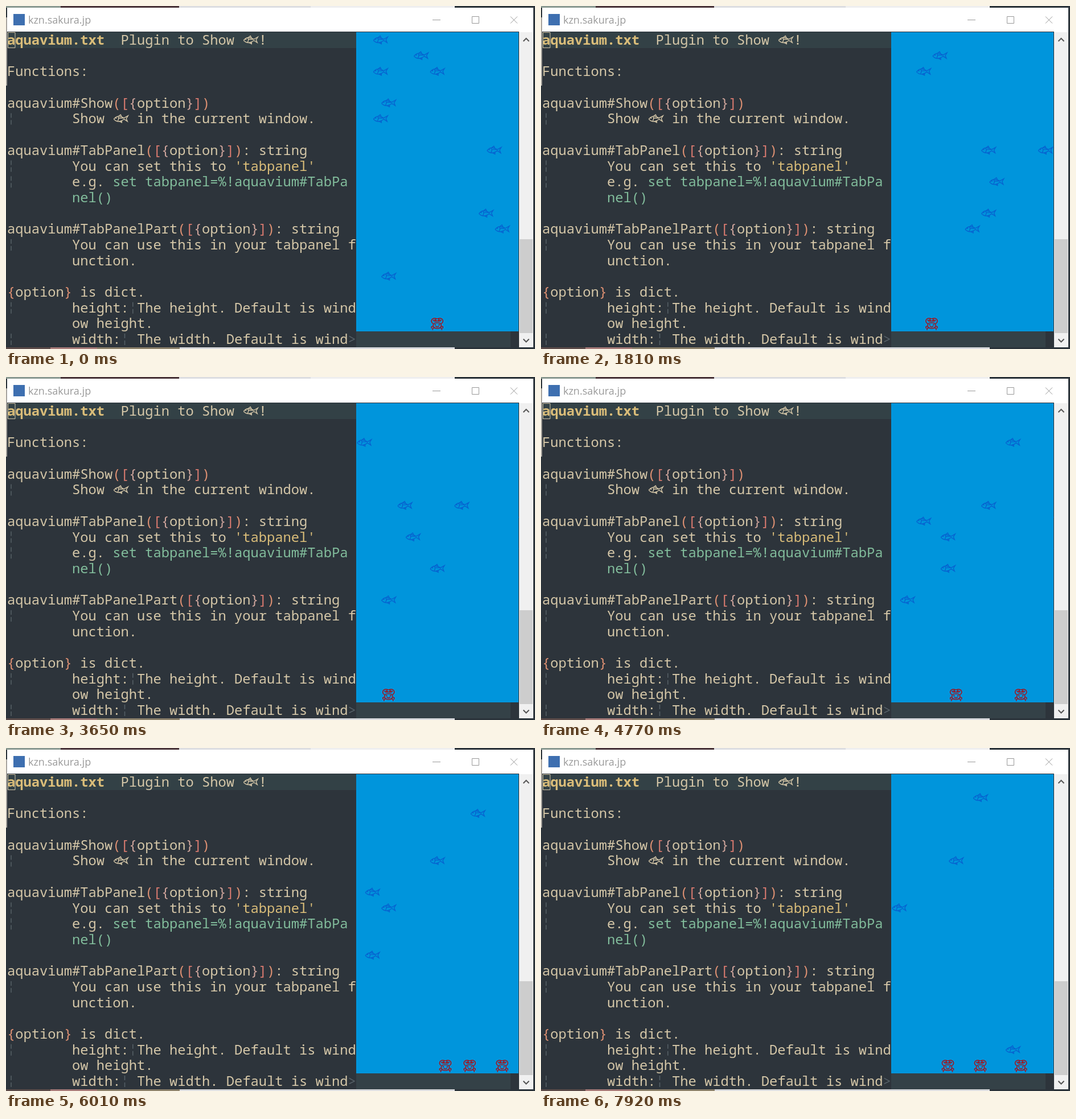
An HTML page with a canvas for the animation above (8 s loop, 929x603 px).

```html
<!DOCTYPE html>
<html lang="en">
<head>
<meta charset="utf-8">
<title>Aquavium</title>
<style>
  html, body { margin: 0; width: 100%; height: 100%; overflow: hidden; background: #2d343b; }
  canvas { display: block; }
</style>
</head>
<body>
<canvas id="stage" width="929" height="603"></canvas>
<script>
const ctx = document.getElementById('stage').getContext('2d');
const LOOP = 8000, CELL_W = 14.25, CELL_H = 27.69, LEFT = 2, TOP = 46, PANEL_COL = 43;
const INK = '#d5c7a8', GREEN = '#82bd9c', YELLOW = '#dabd79', DIM = '#566067', ORANGE = '#df9173';
const BRACKETS = { '(': ORANGE, ')': ORANGE, '[': '#db7b70', ']': '#db7b70', '{': '#cfa59c', '}': '#cfa59c' };

const cellX = col => LEFT + col * CELL_W;
const cellY = row => TOP + row * CELL_H;

function rect(color, x, y, w, h) {
  ctx.fillStyle = color;
  ctx.fillRect(x, y, w, h);
}

function line(color, width, path) {
  ctx.strokeStyle = color;
  ctx.lineWidth = width;
  ctx.stroke(new Path2D(path));
}

// ---- Terminal text ----
function put(row, col, text, color = INK, weight = 400) {
  ctx.font = `${weight} 23.75px "Noto Sans Mono", monospace`;
  for (const part of text.split(/([()[\]{}])/)) {
    ctx.fillStyle = color === INK && BRACKETS[part] || color;
    ctx.fillText(part, cellX(col), cellY(row) + 22);
    col += part.length;
  }
}

function indentMark(row, col) {
  const x = cellX(col) + 7, y = cellY(row);
  line(DIM, 1.5, `M${x} ${y + 4}v8m0 4v8`);
}

// ---- Creatures ----
const FISH = 'M2 1Q9-8 20-1L27-5 24 0 26 5 20 1Q10 9 2 1M9-4Q12 0 9 4M10-4L14-7 16-3M12 5L16 7V4M11-1h8';
const HALF_CRAB = 'M0-2Q8-2 7 4 6 8 0 8M7 0Q12-3 9-8 6-11 1-9L4-7 1-5Q6-4 7-7M7 4L10 5V8M5 7L8 8V11M0 6L3 4';

function fish(col, row, color) {
  ctx.save();
  ctx.translate(cellX(col), cellY(row) + 13.5);
  line(color, 1.4, FISH);
  rect(color, 5, -2, 2, 2);
  ctx.restore();
}

function crab(col, row) {
  const color = '#a5131b';
  ctx.save();
  ctx.translate(cellX(col + 1), cellY(row) + 14.3);
  for (const side of [1, -1]) {
    ctx.scale(side, 1);
    line(color, 1.5, HALF_CRAB);
    rect(color, 2.5, 0.5, 2, 2);
  }
  ctx.restore();
}

// ---- Window ----
function strip(y, bands) {
  let x = 0;
  for (const [color, width] of bands) {
    rect(color, x, y, width, 3);
    x += width;
  }
}

function drawWindow() {
  rect('#2b333a', 0, 0, 929, 603);
  strip(0, [['#8b9a92', 96], ['#49343a', 208], ['#dcdde1', 231], ['#eeeeef', 253]]);
  strip(600, [['#5a4a48', 78], ['#a67a78', 82], ['#8b806a', 145], ['#d8d9dc', 483]]);
  rect('#a9a5a0', 0, 20, 2, 120);

  rect('#fff', 2, 3, 924, 43);
  rect('#3e6fb0', 13, 14, 20, 20);
  ctx.fillStyle = '#999';
  ctx.font = '18px "Open Sans", sans-serif';
  ctx.fillText('kzn.sakura.jp', 39, 31);
  line('#999', 1, 'M749 24.5h14M818.5 18.5h12v12h-12zM886 18.5l12 12m0-12l-12 12');

  rect('#2d343b', 2, 45, 899, 555);
  rect('#f0f0f0', 901, 46, 25, 554);
  rect('#cdcdcd', 902, 410, 23, 165);
  line('#555', 2, 'M908.5 62l5-5 5 5M908.5 585.5l5 5 5-5');
  rect('#334146', 2, TOP, 613, 28);
  rect('#344147', 615, 572, 271, 28);
}

function drawHelp() {
  put(0, 0, 'aquavium.txt', YELLOW, 700);
  put(0, 14, 'Plugin to Show   !');
  fish(29, 0, INK);
  line(INK, 1, 'M3.5 46.5h12.5v27h-12.5z');

  const lines = [
    '', '', 'Functions:', '',
    'aquavium#Show([{option}])',
    '        Show    in the current window.', '',
    'aquavium#TabPanel([{option}]): string',
    '        You can set this to',
    '        e.g.', '', '',
    'aquavium#TabPanelPart([{option}]): string',
    '        You can use this in your tabpanel f',
    '        unction.', '',
    ' option  is dict.',
    '        height: The height. Default is wind',
    '        ow height.',
    '        width:  The width. Default is wind'
  ];
  lines.forEach((text, row) => put(row, 0, text));
  fish(13, 5, INK);
  put(8, 28, "'tabpanel'", YELLOW);
  put(9, 13, 'set tabpanel=%!aquavium#TabPa', GREEN);
  put(10, 8, 'nel()', GREEN);
  put(16, 0, '{      }', ORANGE);
  put(19, 42, '>', DIM);

  for (const row of [5, 8, 9, 13, 17, 19]) indentMark(row, 0);
  indentMark(17, 15);
  indentMark(19, 14);
}

// ---- Aquarium ----
const KEYS = [0, 970, 2660, 3650, 4770, 6010, 7920];
const swimmers = [];

// cols holds the column at each key time from `first` on; turns maps a key to a new row.
function swim(draw, first, row, cols, turns = {}) {
  swimmers.push({ draw, first, row, cols, turns });
}

const blueFish = (col, row) => fish(col, row, '#0763cf');
const addFish = (...track) => swim(blueFish, ...track);
const addCrab = (first, cols) => swim(crab, first, 18, cols);

for (const row of [0, 2, 5]) addFish(0, row, [2, -1]);
for (const row of [4, 15]) addFish(0, row, [3, -1]);
addFish(0, 1, [7, 7, 3, 0, -4], { 3: 2 });
addFish(0, 2, [9, 6, -1]);
addFish(0, 7, [16, 14, 8, 5, 3, 1, -2], { 2: 6, 4: 7 });
addFish(0, 9, [20, 15, 9, 6, 6, 3, 0], { 3: 8 });
addFish(0, 11, [15, 13, 9, 9, 6, 1, -4], { 2: 10, 5: 11 });
addFish(0, 12, [17, 12, 6, 3, 1, -2]);
addFish(1, 7, [20, 15, 12, 11, 9, 7], { 3: 6, 5: 5 });
addFish(3, 2, [20, 14, 14, 10], { 6: 1 });
addFish(5, 17, [20, 14]);
addCrab(0, [9, 5, 2, 3, 7, 10, 6]);
addCrab(3, [20, 15, 13, 10]);
addCrab(4, [20, 17, 15]);

// Redraws come about every 210 ms, with a few pauses.
const BURSTS = [
  [130, 970, 5], [1180, 1810, 4], [2240, 3010, 5], [3650, 4490, 5],
  [4770, 5800, 6], [6010, 7020, 6], [7260, 7400, 2], [7710, 7920, 2]
];

function lastTick(t) {
  const burst = BURSTS.findLast(([first]) => first <= t);
  if (!burst) return 0;
  const [first, last, count] = burst, step = (last - first) / (count - 1);
  return Math.min(last, first + Math.floor((t - first) / step + 0.001) * step);
}

function drawAquarium(t) {
  rect('#0095dc', 615, TOP, 285, 526);
  const key = KEYS.findLastIndex(time => time <= t);
  const k = (t - KEYS[key]) / (KEYS[key + 1] - KEYS[key]) || 0;
  for (const { draw, first, row, cols, turns } of swimmers) {
    const from = cols[key - first], to = cols[key - first + 1] ?? from;
    const col = Math.round(from + (to - from) * k);
    if (!(col >= 0 && col <= 18)) continue;
    const turn = Object.keys(turns).findLast(at => at <= key);
    draw(PANEL_COL + col, turn ? turns[turn] : row);
  }
}

drawWindow();
drawHelp();

const start = performance.now();
function frame() {
  drawAquarium(lastTick((performance.now() - start) % LOOP));
  requestAnimationFrame(frame);
}
frame();
</script>
</body>
</html>
```
